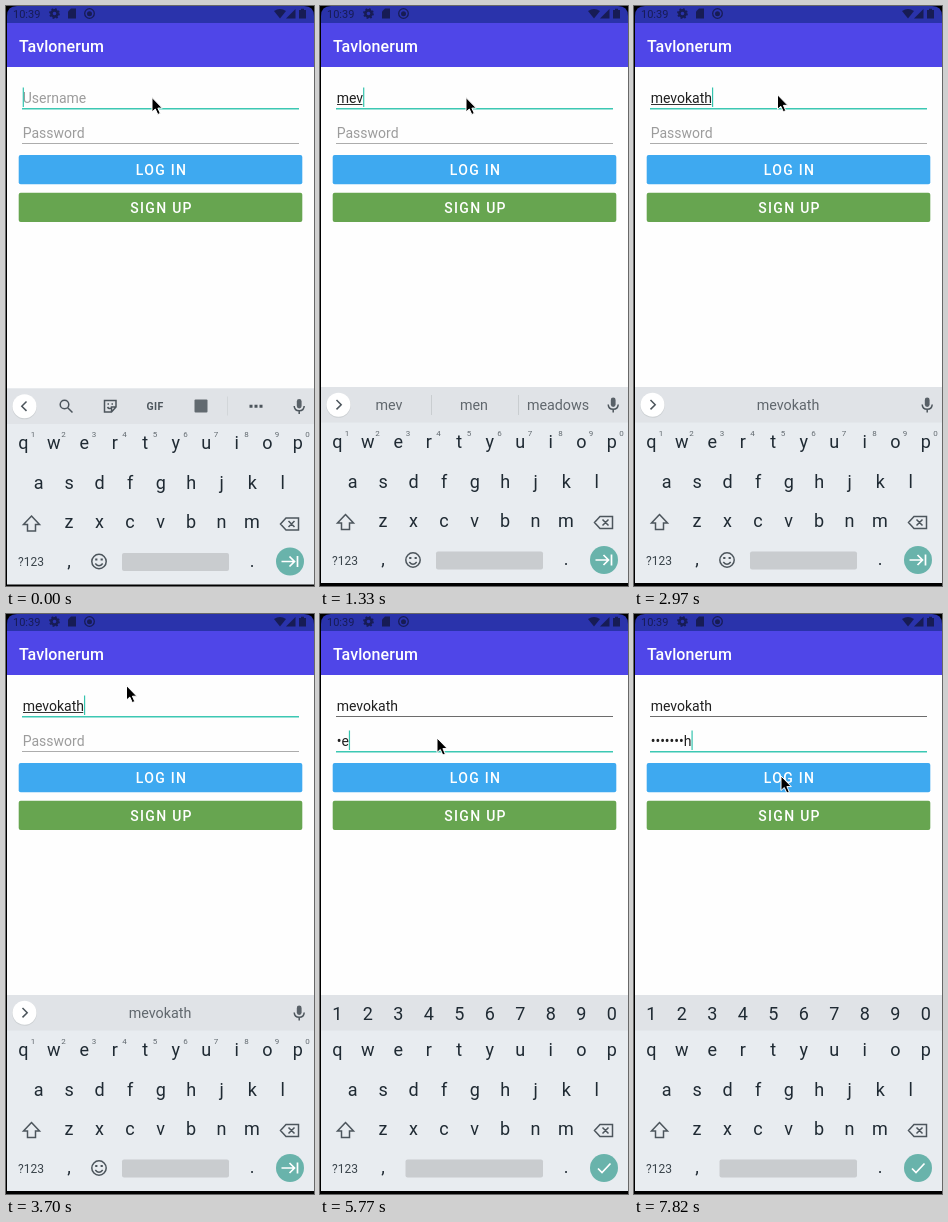
Recreate the animation shown at these times as an HTML page. Size 308 by 580 pixels, loop 8 s.

```html
<!DOCTYPE html>
<html lang="en">
<head>
<meta charset="utf-8">
<title>Login form</title>
<style>
  html, body { margin: 0; width: 100%; height: 100%; overflow: hidden; background: #000; }
  svg { display: block; width: 100%; height: 100%; }
  text { font-family: Roboto, "Open Sans", sans-serif; white-space: pre; }
  .field { font-size: 14px; fill: #202020; }
  .hint { font-size: 14px; fill: #9c9c9c; }
  .button { font-size: 14px; font-weight: 500; letter-spacing: 1.3px; fill: #fff; text-anchor: middle; }
  .key { font-size: 18px; fill: #1f2a33; text-anchor: middle; }
  .sup { font-size: 8px; fill: #626a70; text-anchor: middle; }
  .word { font-size: 14.3px; fill: #60676d; text-anchor: middle; }
  .line { fill: none; stroke: #4c555c; stroke-width: 1.5; }
  .white { fill: none; stroke: #fff; stroke-width: 1.7; }
</style>
</head>
<body>
<svg viewBox="0 0 308 580" preserveAspectRatio="none">
  <rect width="308" height="580" fill="#000"/>
  <rect x="1" y="17" width="307" height="560" fill="#fefefe"/>
  <path d="M1 17V10Q1 0 11 0H298Q308 0 308 10V17Z" fill="#2a33ab"/>
  <rect x="1" y="17" width="307" height="44" fill="#4f46e8"/>
  <g fill="#171c55">
    <text x="7" y="12" font-size="11">10:39</text>
    <circle cx="48.5" cy="7.5" r="3.1" fill="none" stroke="#171c55" stroke-width="2.6"/>
    <circle cx="48.5" cy="7.5" r="4.6" fill="none" stroke="#171c55" stroke-width="1.6" stroke-dasharray="1.8 1.8"/>
    <path d="M62 5.5L65 2.5H70V12.5H62Z"/>
    <circle cx="83.5" cy="7.5" r="4.8" fill="none" stroke="#171c55" stroke-width="1.3"/>
    <circle cx="83.5" cy="7.8" r="2.5"/>
    <path d="M268 5Q274 1 280 5L274 12.5Z"/>
    <path d="M280 12.5L289.5 3V12.5Z"/>
    <path d="M293 4H295V2.8H298V4H300V12.5H293Z"/>
  </g>
  <text x="13" y="45.5" font-size="16" font-weight="500" fill="#fff" letter-spacing=".1">Tavlonerum</text>

  <text id="userHint" class="hint" x="16.7" y="96.5">Username</text>
  <text id="user" class="field" x="16.7" y="96.5"></text>
  <rect id="composing" x="17" y="98" height="1" fill="#333"/>
  <rect id="userLine" x="16" width="277"/>
  <text id="passHint" class="hint" x="16.7" y="132">Password</text>
  <text id="pass" class="field" x="16.7" y="132"></text>
  <rect id="passLine" x="16" width="277"/>
  <rect id="caret" width="1.2" height="19.5" fill="#35c4ae"/>

  <rect x="12.7" y="149.1" width="283.6" height="29.2" rx="2" fill="#3ea9f0"/>
  <text class="button" x="155.6" y="169">LOG IN</text>
  <rect x="12.7" y="186.7" width="283.6" height="29.2" rx="2" fill="#67a550"/>
  <text class="button" x="155.6" y="206.5">SIGN UP</text>

  <g id="keyboard">
    <rect x="1" y="381" width="307" height="196" fill="#e8ecf0"/>
    <rect x="1" y="381" width="307" height="35.5" fill="#e0e3e7"/>
    <g id="keys"></g>
    <g id="sups"></g>
    <g id="digits"></g>
    <path class="line" d="M25.5 508.5L33.5 517H29.5V523.5H21.5V517H17.5Z"/>
    <path class="line" d="M280 510.5H292.5V522.5H280L274.5 516.5ZM282.5 513.5L288.5 519.5M288.5 513.5L282.5 519.5"/>
    <text x="25" y="558.5" font-size="12" fill="#39434a" text-anchor="middle">?123</text>
    <text class="key" x="63" y="559">,</text>
    <text class="key" x="246" y="559">.</text>
    <g id="emoji">
      <circle class="line" cx="93" cy="554" r="7.2"/>
      <path class="line" d="M89.3 556Q93 560.5 96.7 556" />
      <path d="M89.2 551h2.2v2h-2.2zM94.6 551h2.2v2h-2.2z" fill="#4c555c"/>
    </g>
    <rect id="space" y="545.5" height="18" rx="2" fill="#c9cccf"/>
    <circle cx="284" cy="554" r="14" fill="#69b3ab"/>
    <path id="next" class="white" d="M275.5 554H288M283.5 549L288.5 554L283.5 559M291.5 548.5V559.5"/>
    <path id="done" class="white" d="M278 554.5L282 558.5L290.5 549.5"/>

    <g id="strip">
      <circle cx="18.5" cy="399.5" r="12.3" fill="#cdd1d4"/>
      <circle cx="18.5" cy="398.7" r="12" fill="#fff"/>
      <path id="chevron" class="line"/>
      <rect x="290.8" y="391.5" width="4.8" height="9.5" rx="2.4" fill="#596168"/>
      <path class="line" d="M288.2 398.5Q288.5 403.3 293.2 403.3Q297.9 403.3 298.2 398.5M293.2 403.3V406.5"/>
    </g>
    <g id="tools">
      <circle class="line" cx="58.5" cy="397" r="4.3"/>
      <path class="line" d="M61.7 400.2L66.5 405"/>
      <path class="line" d="M98.5 393H110V399.5L105.5 404.5H98.5ZM110 399.5H105.5V404.5M101.5 399.5Q103 402 105 400.5M101.5 396.5h1.5M105.5 396.5h1.5"/>
      <text x="149" y="402.5" font-size="10.5" font-weight="700" fill="#4c555c" text-anchor="middle" letter-spacing=".4">GIF</text>
      <rect x="188.5" y="392" width="13" height="13" rx="1" fill="#626a70"/>
      <rect x="221" y="389" width="1" height="19" fill="#d2d6d9"/>
      <path d="M243.5 397.3h3v3h-3zM248.5 397.3h3v3h-3zM253.5 397.3h3v3h-3z" fill="#4c555c"/>
    </g>
    <g id="words">
      <text class="word" x="69" y="404"></text>
      <text class="word" x="154" y="404"></text>
      <text class="word" x="238" y="404"></text>
      <path id="dividers" d="M111.5 389V409M198.5 389V409" stroke="#c9cdd0"/>
    </g>
  </g>
  <path id="pointer" d="M0 0V14.5L3.3 11.5L5.8 17L8.3 15.9L5.9 10.6H10.3Z" fill="#000" stroke="#fff" stroke-width="1" stroke-linejoin="round"/>
</svg>
<script>
const $ = id => document.getElementById(id);
const LOOP = 8000, TICK = 147.5, NAME = "mevokath";
const FOCUS = 4740, NUMERIC = 4890;

// Moments at which each letter is entered
const userTimes = [740, 1030, 1330, 1470, 2070, 2220, 2520, 2670];
const passTimes = [5480, 5770, 5910, 6060, 6360, 6500, 6800, 6940];
// Spans in which the caret is hidden
const caretOff = [[600, 740], [3110, 3700], [4140, 4740], [5190, 5480], [7390, 7820]];
// Side suggestions by number of letters; longer entries have none
const suggestions = { 1: ["my", "maybe"], 2: ["my", "meet"], 3: ["men", "meadows"], 4: ["move", "meadows"] };
// Pointer path: tick, x, y
const path = [[19, 146, 91.5], [21, 141, 86], [23, 129, 75], [25, 120.5, 71.6], [26, 119, 94],
  [27, 117, 127], [29, 117, 124], [49, 117, 124], [50, 124, 136], [51, 139, 160], [52, 147, 167], [53, 147, 162]];

function addText(parent, cls, x, y, str) {
  const el = document.createElementNS("http://www.w3.org/2000/svg", "text");
  el.setAttribute("class", cls);
  el.setAttribute("x", x);
  el.setAttribute("y", y);
  el.textContent = str;
  $(parent).append(el);
}

function addRow(parent, cls, x, y, chars) {
  [...chars].forEach((c, i) => addText(parent, cls, x + i * 30.5, y, c));
}

addRow("keys", "key", 17.3, 441.5, "qwertyuiop");
addRow("keys", "key", 32.7, 481.5, "asdfghjkl");
addRow("keys", "key", 63, 520.5, "zxcvbnm");
addRow("sups", "sup", 27, 429.5, "1234567890");
addRow("digits", "key", 17.3, 405.5, "1234567890");

const show = (id, on) => $(id).setAttribute("display", on ? "inline" : "none");
const set = (id, attrs) => { for (const k in attrs) $(id).setAttribute(k, attrs[k]); };
const count = (times, t) => times.filter(v => t >= v).length;

function pointerAt(tick) {
  if (tick <= path[0][0]) return path[0].slice(1);
  for (let i = 1; i < path.length; i++) {
    const [b, bx, by] = path[i], [a, ax, ay] = path[i - 1];
    if (tick <= b) {
      const k = (tick - a) / (b - a);
      return [ax + (bx - ax) * k, ay + (by - ay) * k];
    }
  }
  return path[path.length - 1].slice(1);
}

function underline(id, y, active, idle) {
  set(id, { y, height: active ? 1.5 : 1, fill: active ? "#3cc8b3" : idle });
}

function drawForm(t, typed, secret) {
  const inPass = t >= FOCUS;
  $("user").textContent = NAME.slice(0, typed);
  $("pass").textContent = secret ? "•".repeat(secret - 1) + NAME[secret - 1] : "";
  show("userHint", !typed);
  show("passHint", !secret);
  underline("userLine", 102, !inPass, "#6c6c6c");
  underline("passLine", 137, inPass, "#acacac");

  const width = typed ? $("user").getComputedTextLength() : 0;
  set("composing", { width: Math.max(0, width - 1) });
  show("composing", typed && !inPass);

  const empty = inPass ? !secret : !typed;
  const length = empty ? 0 : $(inPass ? "pass" : "user").getComputedTextLength();
  set("caret", { x: 16.7 + length, y: inPass ? 116.5 : 81.5 });
  show("caret", !caretOff.some(([a, b]) => t >= a && t < b));
}

function drawKeyboard(t, typed) {
  const numeric = t >= NUMERIC, tools = t < 890;
  set("keyboard", { transform: `translate(0 ${t < 150 ? 1.5 : 0})` });
  for (const id of ["sups", "emoji", "next", "strip"]) show(id, !numeric);
  for (const id of ["digits", "done"]) show(id, numeric);
  show("tools", tools);
  show("words", !tools && !numeric);
  set("space", numeric ? { x: 85.5, width: 137.5 } : { x: 116, width: 107 });
  set("chevron", { d: tools ? "M20.5 394L15.8 398.7L20.5 403.4" : "M16.5 394L21.2 398.7L16.5 403.4" });

  const sides = suggestions[typed], entry = NAME.slice(0, typed);
  const words = sides ? [entry, ...sides] : ["", entry, ""];
  $("words").querySelectorAll("text").forEach((el, i) => { el.textContent = words[i]; });
  show("dividers", !!sides);
}

function draw(ms) {
  const t = ms % LOOP + 5;
  const typed = count(userTimes, t);
  drawForm(t, typed, count(passTimes, t));
  drawKeyboard(t, typed);
  const [x, y] = pointerAt(Math.floor(t / TICK));
  set("pointer", { transform: `translate(${x} ${y})` });
}

const start = performance.now();
function loop() {
  draw(performance.now() - start);
  requestAnimationFrame(loop);
}
loop();
</script>
</body>
</html>
```
